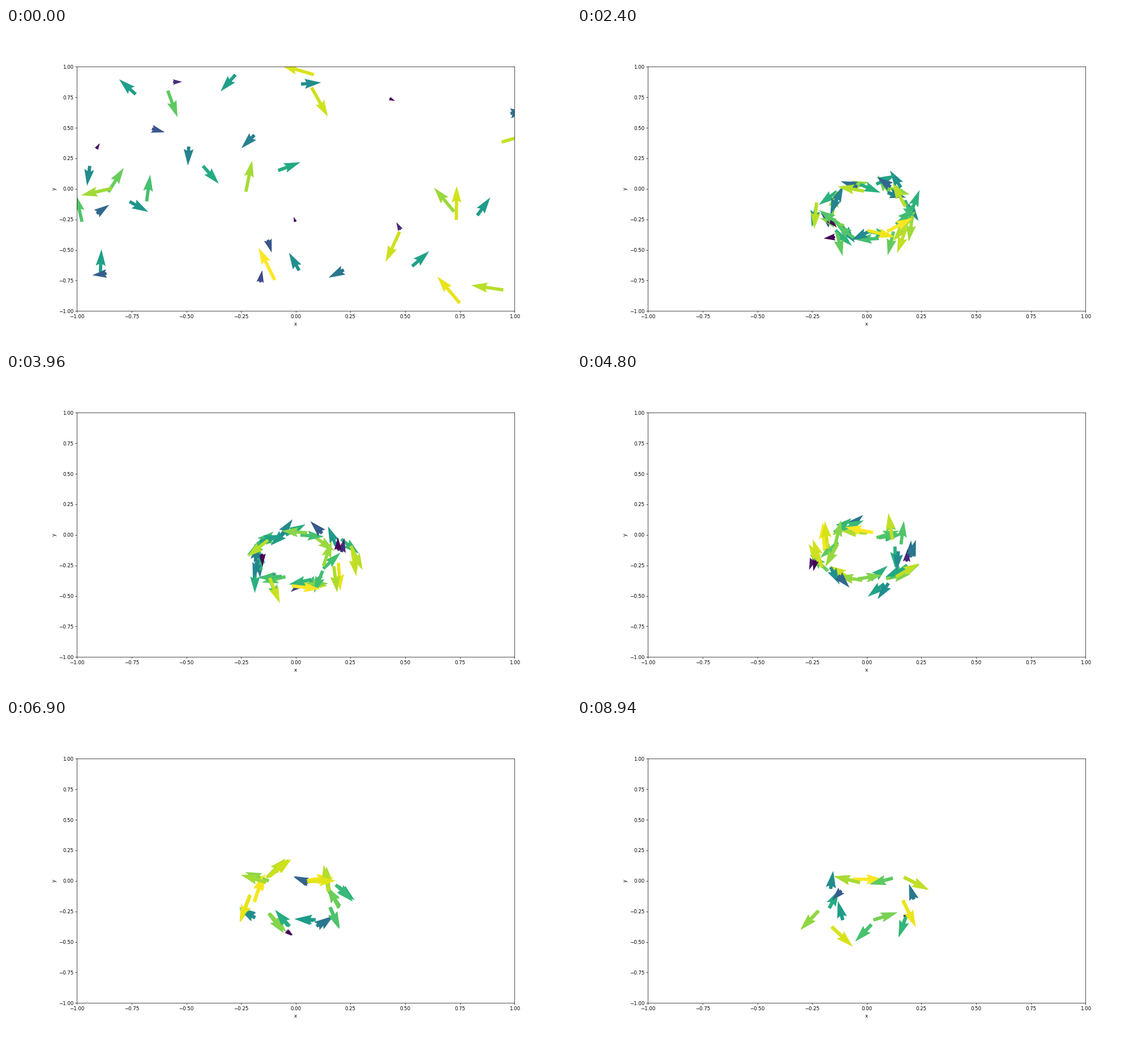
Animation, 998 px wide and 561 px high, one loop 9000 ms. Source, as a matplotlib script:

```python
import numpy as np
import matplotlib.pyplot as plt
from matplotlib.animation import FuncAnimation

W, H, DPI = 998, 561, 62.5
FRAMES, INTERVAL = 150, 60
COUNT, GROUPS = 40, 16
ARRIVE = 15                # frame in which the swarm has reached the ring
TURN = 0.22                # radians per frame on the ring
STEP = 0.045 / 48          # distance per frame for one pixel of arrow
HUB = 0 - 0.18j

rng = np.random.default_rng(11)


def arc(length, angle):
    return length * np.exp(1j * angle)


def ring(count, spin):
    """Radius, heading against the phase and arrow length of ring members."""
    rad = 0.2 + 0.045 * rng.uniform(-1, 1, count)
    tilt = spin * np.radians(rng.normal(80, 26, count))
    size = 11 + 42 * rng.permutation(np.linspace(0, 1, count)) ** 0.45
    return np.array([rad, tilt, size])


# Groups circle the hub in both directions; members close up on their group.
spins = np.where(np.arange(GROUPS) % 2, 1, -1)
spots = 2 * np.pi * (np.arange(GROUPS) + rng.uniform(-0.3, 0.3, GROUPS)) / GROUPS
group = np.arange(COUNT) % GROUPS
spin, spot = spins[group], spots[group]
own, shared = ring(COUNT, spin), ring(GROUPS, spins)[:, group]
lag = rng.uniform(-1, 1, COUNT)


def orbit(n):
    u = (n - ARRIVE) / (FRAMES - ARRIVE)
    w = 1 - (1 - u) ** 2
    rad, tilt, size = own + (shared - own) * w
    rad = rad * (1 + 0.12 * np.sin(0.15 * n + 2 * spot))
    angle = spot + spin * TURN * n + lag * (1 - w)
    return arc(rad, angle), arc(size, angle + tilt)


# Scattered start; every arrow flies to the ring on its own side of the hub.
end_z, end_v = orbit(ARRIVE)
start_z = rng.uniform(-1, 1, COUNT) + 1j * rng.uniform(-1, 1, COUNT) - HUB
rank = np.argsort(np.argsort(np.angle(end_z)))
start_z = start_z[np.argsort(np.angle(start_z))][rank]
start_v = arc(70 * rng.beta(2.2, 1.5, COUNT), rng.uniform(0, 2 * np.pi, COUNT))


def gather(n):
    u = n / ARRIVE
    m0, m1 = start_v * STEP * ARRIVE, end_v * STEP * ARRIVE
    gap = end_z - start_z
    z = (start_z + gap * u * u * (3 - 2 * u)
         + m0 * u * (1 - u) ** 2 - m1 * u * u * (1 - u))
    slope = (gap * 6 * u * (1 - u) + m0 * (1 - u) * (1 - 3 * u)
             + m1 * u * (3 * u - 2))
    length = abs(start_v) * (1 - u) + abs(end_v) * u
    return z, arc(length, np.angle(slope))


def swarm(n):
    z, v = gather(n) if n < ARRIVE else orbit(n)
    return z + HUB, v


fig, ax = plt.subplots(figsize=(W / DPI, H / DPI), dpi=DPI)
fig.subplots_adjust(left=125.4 / W, right=0.9, bottom=0.11, top=1 - 68.4 / H)
ax.set(xlim=(-1, 1), ylim=(-1, 1), xlabel="x", ylabel="y")
z, v = swarm(0)
arrows = ax.quiver(z.real, z.imag, v.real, v.imag, abs(v), cmap="viridis",
                   scale=1, scale_units="dots", width=0.0075)


def draw(n):
    z, v = swarm(n)
    arrows.set_offsets(np.column_stack([z.real, z.imag]))
    arrows.set_UVC(v.real, v.imag, abs(v))
    arrows.autoscale()
    return [arrows]


anim = FuncAnimation(fig, draw, frames=FRAMES, interval=INTERVAL,
                     init_func=lambda: draw(0), repeat=True, repeat_delay=0)
plt.show()
```
